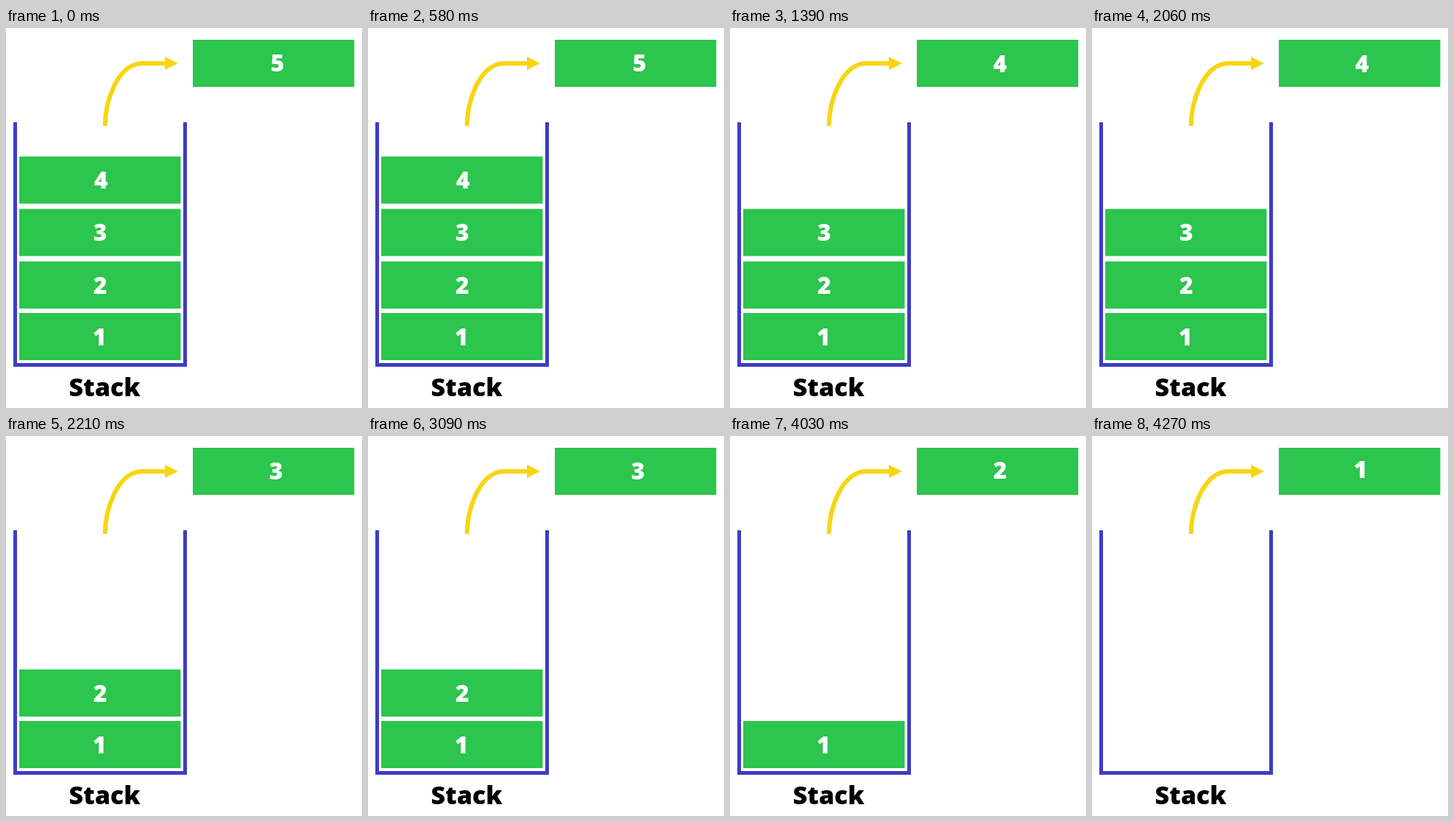
Write an HTML page that moves like this. It is 484 by 516 pixels and loops after 4300 ms.

```html
<!DOCTYPE html>
<html lang="en">
<head>
<meta charset="utf-8">
<title>Stack pop</title>
<style>
  html, body { margin: 0; width: 100%; height: 100%; overflow: hidden; background: #fff; }
  svg { display: block; width: 484px; height: 516px; }
  text { font: 800 32px "Open Sans", sans-serif; text-anchor: middle; fill: #fff; }
  .label { font-size: 34px; fill: #000; }
  .block { fill: #2cc54e; }
</style>
</head>
<body>
<svg viewBox="0 0 484 516">
  <path d="M12.5 128V457.5H243.5V128" fill="none" stroke="#3e3cc4" stroke-width="5"/>
  <path d="M134.5 133C135 100 151 48 186 48H218" fill="none" stroke="#f8d512" stroke-width="6"/>
  <path d="M216 39L234 48L216 57Z" fill="#f8d512"/>
  <text class="label" x="134" y="499.5">Stack</text>
  <g id="blocks"></g>
</svg>
<script>
  const LOOP = 4300;
  // Each item: digit centre in the stack, popped digit centre, block top, pop time.
  const items = [
    { n: 1, x: 127, y: 419, outX: 365, outY: 45.5, top: 387, pop: 4150 },
    { n: 2, x: 128, y: 349, outX: 367, outY: 46, top: 317, pop: 3180 },
    { n: 3, x: 128, y: 277, outX: 367, outY: 47, top: 245.7, pop: 2210 },
    { n: 4, x: 129, y: 206, outX: 367, outY: 48, top: 174.5, pop: 1240 },
    { n: 5, x: 129, y: 135, outX: 369, outY: 47, top: 103, pop: 0 }
  ];

  const layer = document.getElementById("blocks");

  function add(parent, tag, attrs) {
    const el = document.createElementNS("http://www.w3.org/2000/svg", tag);
    for (const key in attrs) el.setAttribute(key, attrs[key]);
    return parent.appendChild(el);
  }

  function addBlock(n, left, top, x, y) {
    const group = add(layer, "g", {});
    add(group, "rect", { class: "block", x: left, y: top, width: 219.5, height: 64 });
    add(group, "text", { x, y: y + 11.5 }).textContent = n;
    return group;
  }

  for (const item of items) {
    item.inside = addBlock(item.n, 18, item.top, item.x, item.y);
    item.outside = addBlock(item.n, 254, 16, item.outX, item.outY);
  }

  const show = (el, on) => el.setAttribute("visibility", on ? "visible" : "hidden");

  function draw(time) {
    const t = time % LOOP;
    const current = items.find(item => t >= item.pop);
    for (const item of items) {
      show(item.inside, t < item.pop);
      show(item.outside, item === current);
    }
  }

  const start = performance.now();
  function tick() {
    draw(performance.now() - start);
    requestAnimationFrame(tick);
  }
  tick();
</script>
</body>
</html>
```
